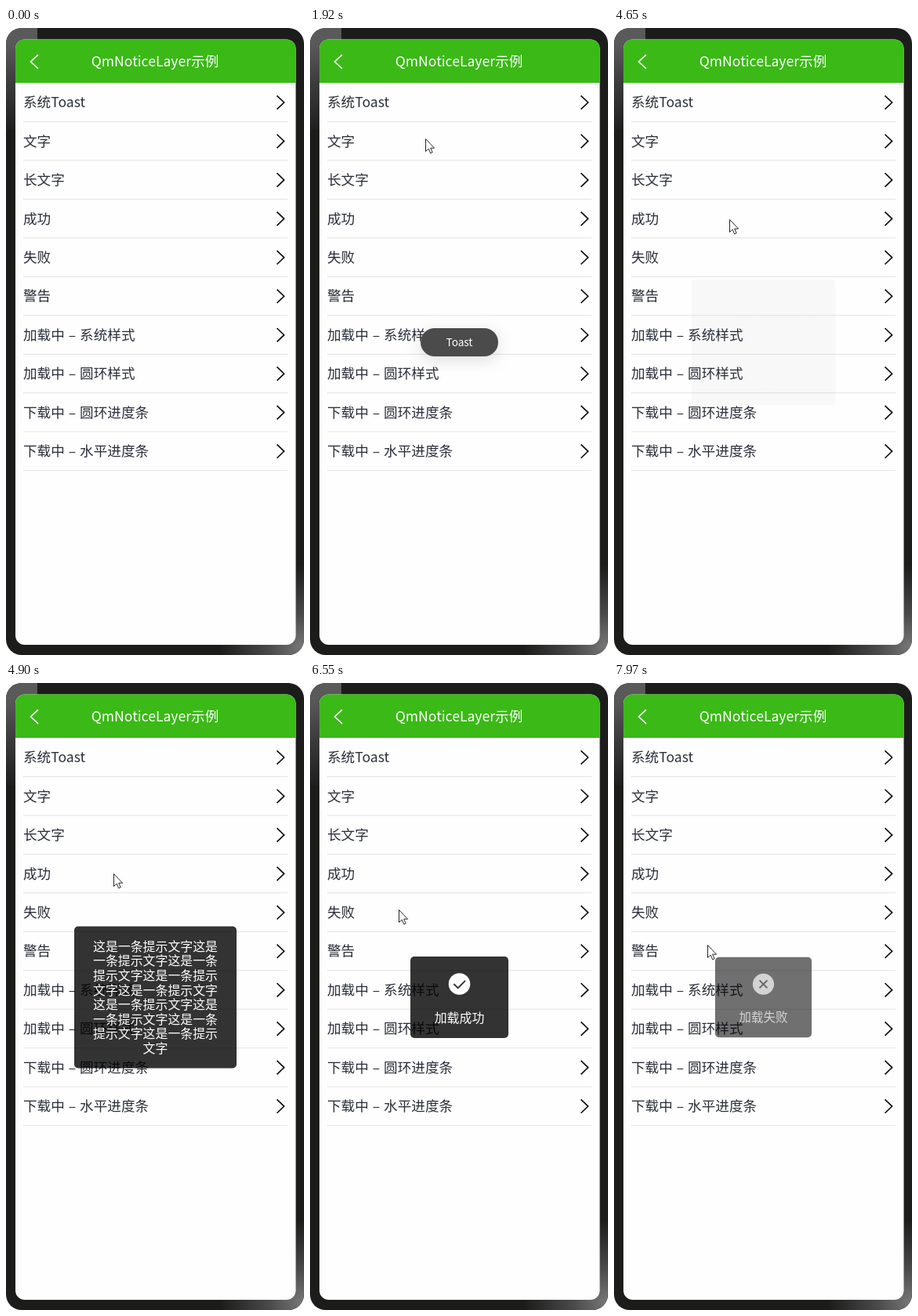
Recreate the animation shown at these times as an HTML page. Size 380 by 800 pixels, loop 8000 ms.

```html
<!DOCTYPE html>
<html lang="zh-CN">
<head>
<meta charset="utf-8">
<title>HUD</title>
<style>
html, body { margin: 0; width: 100%; height: 100%; overflow: hidden; background: #fff; }
svg { display: block; }
text { font: 17.6px "Noto Sans CJK SC", "Noto Sans CJK", sans-serif; }
.row { fill: #2a2e39; word-spacing: 1px; }
.hud { --a: 0; transform-origin: 190.5px 401px; }
.hud rect { opacity: calc(var(--a) * .8); }
.hud .ink { opacity: var(--a); }
.hud text { font-size: 15.9px; fill: #fff; text-anchor: middle; }
#toast rect { filter: drop-shadow(0 5px 10px rgba(0, 0, 0, .13)); }
</style>
</head>
<body>
<svg width="380" height="800" viewBox="0 0 380 800">
  <defs>
    <linearGradient id="shineTop" gradientUnits="userSpaceOnUse" x1="0" y1="20" x2="26" y2="130">
      <stop offset="0" stop-color="#5a5a5a"/><stop offset=".45" stop-color="#3c3c3c"/>
      <stop offset="1" stop-color="#1c1c1b"/>
    </linearGradient>
    <radialGradient id="shineEnd" gradientUnits="userSpaceOnUse" cx="378" cy="790" r="105">
      <stop offset="0" stop-color="#777"/><stop offset=".4" stop-color="#4a4a4a"/>
      <stop offset="1" stop-color="#1c1c1b"/>
    </radialGradient>
    <clipPath id="screen"><rect x="12" y="14.5" width="357.5" height="772.5" rx="12"/></clipPath>
    <clipPath id="body"><rect width="380" height="800" rx="20"/></clipPath>
  </defs>
  <g clip-path="url(#body)">
    <rect width="380" height="800" fill="#1c1c1b"/>
    <rect width="40" height="130" fill="url(#shineTop)"/>
    <rect x="270" y="680" width="110" height="120" fill="url(#shineEnd)"/>
  </g>
  <g clip-path="url(#screen)">
    <rect x="12" y="14" width="358" height="774" fill="#fefefe"/>
    <rect x="12" y="14" width="358" height="56" fill="#3bb917"/>
  </g>
  <path d="M41 34.2 31.5 43 41 51.8" fill="none" stroke="#fff" stroke-width="1.6"/>
  <text x="190" y="48.8" fill="#fff" text-anchor="middle">QmNoticeLayer示例</text>
  <g id="list"></g>
  <g id="toast">
    <rect x="141" y="383" width="99" height="36" rx="18" fill="#4b4b4b"/>
    <text x="190.5" y="406" fill="#fff" text-anchor="middle" style="font-size:13.6px">Toast</text>
  </g>
  <g id="huds"></g>
  <path id="cursor" d="M.5 .5V16.5L4.2 13.1 6.7 18.8 9.2 17.7 6.7 12.2H11.6Z" fill="#fff" stroke="#26262a"/>
</svg>
<script>
const $ = id => document.getElementById(id);
const clamp = v => Math.max(0, Math.min(1, v));
const LOOP = 8000, CX = 190.5, CY = 401, LINE = 18.6;

const labels = ['系统Toast', '文字', '长文字', '成功', '失败', '警告',
  '加载中 – 系统样式', '加载中 – 圆环样式', '下载中 – 圆环进度条', '下载中 – 水平进度条'];
$('list').innerHTML = labels.map((label, i) => `<g transform="translate(0 ${i * 49.45})">
  <text class="row" x="22" y="101.2">${label}</text>
  <path d="M345.5 86.3 354.6 95 345.5 103.7" fill="none" stroke="#111" stroke-width="1.7"/>
  <path d="M22 119.5H359" stroke="#e3e3e3"/></g>`).join('');

const box = (w, h) =>
  `<rect x="${CX - w / 2}" y="${CY - h / 2}" width="${w}" height="${h}" rx="5"/>`;
const line = (s, y) => `<text class="ink" x="${CX}" y="${y + 5.9}">${s}</text>`;
const iconHud = (mark, s) => box(125, 104) +
  `<circle class="ink" cx="${CX}" cy="384" r="13.8" fill="#fff"/>
   <path class="ink" d="${mark}" fill="none" stroke="#333" stroke-width="1.9"/>` + line(s, 427);

const tip = '这是一条提示文字';
const longLines = tip.repeat(9).match(/.{1,10}/g);
const huds = [
  { enter: 3028, exit: 4030, art: box(175, 50) + line(tip, CY) },
  { enter: 4648, exit: 5680, art: box(207, 181) +
    longLines.map((s, i) => line(s, CY + (i - (longLines.length - 1) / 2) * LINE)).join('') },
  { enter: 6298, exit: 7280, art: iconHud('M183.3 384 188.7 389.2 198 379.8', '加载成功') },
  { enter: 7898, exit: 9000, art: iconHud('M185.5 379 195.5 389M195.5 379 185.5 389', '加载失败') }
];
$('huds').innerHTML = huds.map(h => `<g class="hud">${h.art}</g>`).join('');
huds.forEach((h, i) => h.el = $('huds').children[i]);

// time, x, y of the pointer tip
const path = [[130, 53, 458], [470, 165, 92], [1600, 165, 92], [1920, 147, 141],
  [3385, 147, 141], [3570, 140, 191], [4600, 140, 191], [4650, 147, 244], [4800, 137, 243],
  [6250, 137, 243], [6400, 113, 289], [7850, 113, 289], [7970, 119, 334]];

// the screen refreshes only at these moments
const ticks = [0];
const addTicks = (from, to, n) => {
  for (let i = 0; i < n; i++) ticks.push(Math.round(from + (to - from) * i / (n - 1)));
};
addTicks(130, 470, 8);
addTicks(1450, 1920, 10);
addTicks(3430, 3570, 4);
addTicks(7870, 7970, 3);
for (const t of [3000, 4620, 6270]) { ticks.push(t); addTicks(t + 30, t + 280, 6); }
for (const t of [4050, 5700, 7300]) { ticks.push(t); addTicks(t + 30, t + 230, 3); }
ticks.sort((a, b) => b - a);

function pointer(t) {
  const i = path.findIndex(p => p[0] > t);
  if (i < 0) return path[path.length - 1].slice(1);
  const [t0, x0, y0] = path[Math.max(0, i - 1)], [t1, x1, y1] = path[i];
  const k = t1 > t0 ? clamp((t - t0) / (t1 - t0)) : 0;
  return [x0 + (x1 - x0) * k, y0 + (y1 - y0) * k];
}

function hudPose(h, t) {
  if (t < h.enter) return [0, 1];
  const rest = 1 - clamp((t - h.enter) / 250), out = clamp((t - h.exit) / 250);
  if (out > 0) return [(1 - out) ** 2.2, Math.max(.885, 1 - .6 * out)];
  return [1 - rest ** 3.5, 1 - .12 * rest ** 6];
}

function draw(now) {
  const time = now % LOOP, t = ticks.find(k => k <= time);
  for (const h of huds) {
    const [alpha, scale] = hudPose(h, t);
    h.el.style.setProperty('--a', alpha);
    h.el.style.transform = `scale(${scale})`;
  }
  $('toast').style.opacity = clamp((t - 1400) / 200) * (1 - clamp((t - 2970) / 100));
  $('cursor').style.visibility = t < 130 ? 'hidden' : 'visible';
  $('cursor').setAttribute('transform', `translate(${pointer(t)})`);
}

const start = performance.now();
function loop() {
  draw(performance.now() - start);
  requestAnimationFrame(loop);
}
loop();
</script>
</body>
</html>
```
